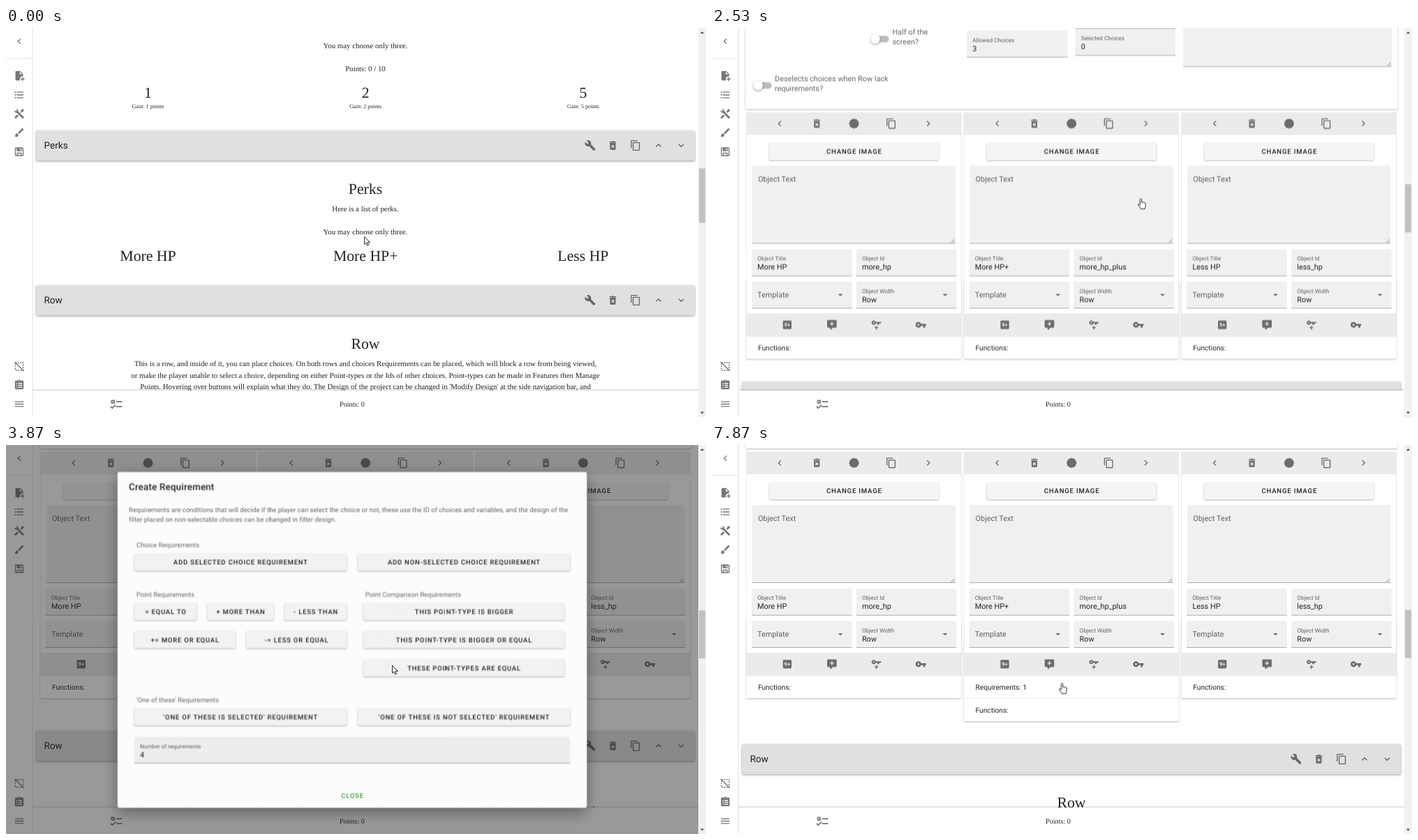
Recreate the animation shown at these times as an HTML page. Size 1003 by 558 pixels, loop 8000 ms.

```html
<!DOCTYPE html>
<html lang="en">
<head>
<meta charset="utf-8">
<title>Row editor</title>
<style>
html, body { margin: 0; width: 100%; height: 100%; overflow: hidden; background: #fff; }
svg { display: block; width: 1003px; height: 558px; }
text { font-family: Roboto, sans-serif; fill: #000; fill-opacity: .87; text-rendering: geometricPrecision; white-space: pre; }
.serif { font-family: "Liberation Serif", "Times New Roman", serif; }
.mid { text-anchor: middle; }
.soft { fill-opacity: .6; }
.btn { font-weight: 500; letter-spacing: .0893em; }
.ic { fill: #000; fill-opacity: .54; fill-rule: evenodd; }
.bar { fill: #e0e0e0; }
.tool { fill: #ebebeb; }
.sh { filter: drop-shadow(0 1.2px .9px rgba(0,0,0,.28)); }
.sh2 { filter: drop-shadow(0 1.5px 1.8px rgba(0,0,0,.4)); }
.sh3 { filter: drop-shadow(0 7px 11px rgba(0,0,0,.38)); }

/* one shared 8 s clock: 1% = 80 ms */
.anim { animation: 8s linear infinite; }
.step { animation: 8s step-end infinite; }
#page { animation-name: scroll; }
#closed, #thumbClosed { animation-name: closed; }
#open, #thumbOpen { animation-name: open; }
#thumbMove { animation-name: thumb; }
#rows { animation-name: rows; }
#grow { animation-name: grow; }
#req { animation-name: req; }
#fieldHover { animation-name: fieldHover; }
#keyHover { animation-name: keyHover; }
#scrim { animation-name: scrim; }
#dialog { animation-name: dialog; transform-origin: 496px 279.5px; }
#btnHover { animation-name: btnHover; }
#ripple { animation-name: ripple; transform-origin: 357px 166px; }
#cursor { animation-name: cursor; }
#arrow { animation-name: arrow; }
#hand { animation-name: hand; }
#beam { animation-name: beam; }

@keyframes scroll {
  0%, 23.6% { transform: translateY(0); animation-timing-function: ease-in; }
  28.37%, 29.1% { transform: translateY(-190px); animation-timing-function: ease-out; }
  35%, 100% { transform: translateY(-473px); }
}
@keyframes thumb {
  0%, 23.6% { transform: translateY(179.5px); animation-timing-function: ease-in; }
  28.37%, 29.1% { transform: translateY(203px); animation-timing-function: ease-out; }
  35%, 45.9% { transform: translateY(238px); }
  45.95%, 70.95% { transform: translateY(237.2px); }
  71%, 100% { transform: translateY(236.5px); }
}
@keyframes closed { 0% { opacity: 1; } 18.375% { opacity: 0; } }
@keyframes open { 0% { opacity: 0; } 18.375% { opacity: 1; } }
@keyframes rows {
  0% { transform: translateY(0); }
  18.375% { transform: translateY(500px); }
  45.95% { transform: translateY(514px); }
  71% { transform: translateY(533px); }
}
@keyframes grow {
  0% { transform: translateY(0); }
  45.95% { transform: translateY(14px); }
  71% { transform: translateY(33px); }
}
@keyframes req { 0% { opacity: 0; } 71% { opacity: 1; } }
@keyframes fieldHover { 0% { opacity: 0; } 22% { opacity: 1; } 35% { opacity: 0; } }
@keyframes keyHover { 0% { opacity: 0; } 38.8% { opacity: .08; } 45% { opacity: .2; } 47% { opacity: 0; } }
@keyframes scrim {
  0%, 45.95% { opacity: 0; }
  48.3%, 89.1% { opacity: .46; animation-timing-function: ease-in-out; }
  93%, 100% { opacity: 0; }
}
@keyframes dialog {
  0%, 45.95% { opacity: 0; transform: scale(.5); animation-timing-function: cubic-bezier(.25,.8,.25,1); }
  49.7%, 88.36% { opacity: 1; transform: scale(1); }
  88.37%, 100% { opacity: 0; transform: scale(1); }
}
@keyframes btnHover { 0% { opacity: 0; } 70% { opacity: .14; } 72.5% { opacity: 0; } }
@keyframes ripple {
  0%, 69.99% { opacity: 0; transform: scale(1); }
  70%, 70.8% { opacity: .25; transform: scale(1); }
  72.3% { opacity: .25; transform: scale(2); }
  75%, 100% { opacity: 0; transform: scale(2.2); }
}
@keyframes cursor {
  0%, 1.62% { transform: translate(513px,299px); animation-timing-function: cubic-bezier(.4,.1,.6,1); }
  11.6% { transform: translate(816px,180px); animation-timing-function: ease-out; }
  15%, 18.4% { transform: translate(840px,169px); animation-timing-function: ease-in-out; }
  22.8%, 33.5% { transform: translate(614px,244px); animation-timing-function: ease-in-out; }
  39.1%, 39.9% { transform: translate(552px,325px); }
  40.8%, 49% { transform: translate(553px,316px); animation-timing-function: ease-in; }
  55% { transform: translate(498px,278px); animation-timing-function: ease-out; }
  62.5%, 71% { transform: translate(373px,168px); animation-timing-function: ease-in-out; }
  80% { transform: translate(721px,210px); animation-timing-function: ease-out; }
  85%, 88.36% { transform: translate(884px,232px); }
  88.37%, 89.1% { transform: translate(887px,236px); animation-timing-function: ease-in-out; }
  98.3%, 100% { transform: translate(501px,341px); }
}
@keyframes arrow {
  0% { opacity: 1; } 13.6% { opacity: 0; } 19.3% { opacity: 1; } 22% { opacity: 0; }
  35% { opacity: 1; } 40% { opacity: 0; } 46% { opacity: 1; } 61.2% { opacity: 0; }
  72.5% { opacity: 1; } 88.37% { opacity: 0; } 90% { opacity: 1; } 97% { opacity: 0; }
}
@keyframes hand {
  0% { opacity: 0; } 13.6% { opacity: 1; } 19.3% { opacity: 0; } 22% { opacity: 1; }
  35% { opacity: 0; } 40% { opacity: 1; } 46% { opacity: 0; } 61.2% { opacity: 1; }
  72.5% { opacity: 0; } 97% { opacity: 1; }
}
@keyframes beam { 0% { opacity: 0; } 88.37% { opacity: 1; } 90% { opacity: 0; } }
</style>
</head>
<body>
<script>
// Type sizes: CSS pixels times the page scale
const px = n => +(n * .6795).toFixed(2);
const BODY = px(16), SMALL = px(12), BTN = px(14), PANEL = px(15), HEAD = px(32);
const COL = 311.7; // distance between card columns

const badge = 'M' + Array.from({ length: 24 }, (_, i) => {
  const a = i * Math.PI / 12, r = i % 2 ? 9.3 : 11;
  return (12 + r * Math.cos(a)).toFixed(1) + ' ' + (12 + r * Math.sin(a)).toFixed(1);
}).join('L') + 'Z';
const dot = (x, y) => `M${x - 1.5} ${y}a1.5 1.5 0 1 1 3 0a1.5 1.5 0 1 1 -3 0Z`;

const icons = {
  badge,
  left: 'M15.4 16.6L10.8 12L15.4 7.4L14 6L8 12L14 18Z',
  right: 'M8.6 16.6L13.2 12L8.6 7.4L10 6L16 12L10 18Z',
  up: 'M7.4 15.4L12 10.8L16.6 15.4L18 14L12 8L6 14Z',
  down: 'M7.4 8.6L12 13.2L16.6 8.6L18 10L12 16L6 10Z',
  caret: 'M7 10L12 15L17 10Z',
  wrench: 'M22.7 19L13.6 9.9C14.5 7.6 14 4.9 12.1 3C10.1 1 7.1.6 4.7 1.7L9 6L6 9L1.6 4.7C.4 7.1.9 10.1 2.9 12.1C4.8 14 7.5 14.5 9.8 13.6L18.9 22.7C19.3 23.1 19.9 23.1 20.3 22.7L22.6 20.4C23.1 20 23.1 19.3 22.7 19Z',
  trash: 'M6 19A2 2 0 0 0 8 21H16A2 2 0 0 0 18 19V7H6ZM8.5 11.9L9.9 10.5L12 12.6L14.1 10.5L15.5 11.9L13.4 14L15.5 16.1L14.1 17.5L12 15.4L9.9 17.5L8.5 16.1L10.6 14ZM15.5 4L14.5 3H9.5L8.5 4H5V6H19V4Z',
  copy: 'M19 21H8V7H19ZM19 5H8A2 2 0 0 0 6 7V21A2 2 0 0 0 8 23H19A2 2 0 0 0 21 21V7A2 2 0 0 0 19 5ZM16 1H4A2 2 0 0 0 2 3V17H4V3H16Z',
  list: 'M7 5H21V7H7ZM7 11H21V13H7ZM7 17H21V19H7Z' + dot(4, 6) + dot(4, 12) + dot(4, 18),
  file: 'M14 2H6C4.9 2 4 2.9 4 4V20C4 21.1 4.9 22 6 22H13.8C13.3 21.1 13 20 13 19C13 15.7 15.7 13 19 13L20 13.1V8ZM13 9V3.5L18.5 9ZM23 20H20V23H18V20H15V18H18V15H20V18H23Z',
  tools: 'M21.7 20.3L20.3 21.7A1 1 0 0 1 18.9 21.7L7 9.85A3.8 3.8 0 0 1 6 10A4 4 0 0 1 2.2 4.7L4.8 7.2L7.2 4.8L4.7 2.2A4 4 0 0 1 10 6A3.8 3.8 0 0 1 9.85 7L21.7 18.9A1 1 0 0 1 21.7 20.3ZM2.3 18.9A1 1 0 0 0 2.3 20.3L3.7 21.7A1 1 0 0 0 5.1 21.7L10.6 16.25L7.8 13.4ZM20 2L16 4V6L13.8 8.2L15.8 10.2L18 8H20L22 4Z',
  brush: 'M20.7 4.6L19.4 3.3C19 2.9 18.35 2.9 18 3.3L9 12.25L11.75 15L20.7 6C21.1 5.65 21.1 5 20.7 4.6ZM7 14A3 3 0 0 0 4 17C4 18.3 2.8 19 2 19C2.9 20.2 4.5 21 6 21A4 4 0 0 0 10 17A3 3 0 0 0 7 14Z',
  save: 'M5 3H19L21 5V19A2 2 0 0 1 19 21H5A2 2 0 0 1 3 19V5A2 2 0 0 1 5 3ZM5 5V19H19V5ZM7 5H17V11H7ZM13 5V9H15V5ZM7 14H17V19H15V16H9V19H7Z',
  clip: 'M19 3H14.8C14.4 1.8 13.3 1 12 1C10.7 1 9.6 1.8 9.2 3H5A2 2 0 0 0 3 5V19A2 2 0 0 0 5 21H19A2 2 0 0 0 21 19V5A2 2 0 0 0 19 3ZM11 4a1 1 0 1 1 2 0a1 1 0 1 1 -2 0ZM6 8H8V10H6ZM10 8H18V10H10ZM6 12H8V14H6ZM10 12H18V14H10ZM6 16H8V18H6ZM10 16H18V18H10Z',
  menu: 'M3 6H21V8H3ZM3 11H21V13H3ZM3 16H21V18H3Z',
  keyPlus: 'M6.5 3C8.5 3 10.1 4.25 10.7 6H22V9H18V12H14V9H10.7C10.1 10.75 8.5 12 6.5 12C4 12 2 10 2 7.5C2 5 4 3 6.5 3ZM5 7.5a1.5 1.5 0 1 0 3 0a1.5 1.5 0 1 0 -3 0ZM8 17H11V14H13V17H16V19H13V22H11V19H8Z',
  key: 'M5 12a2 2 0 1 0 4 0a2 2 0 1 0 -4 0ZM12.65 10C11.8 7.7 9.6 6 7 6A6 6 0 1 0 12.65 14H17V18H21V14H23V10Z',
  box: 'M5 3H19A2 2 0 0 1 21 5V19A2 2 0 0 1 19 21H5A2 2 0 0 1 3 19V5A2 2 0 0 1 5 3Z',
  comment: 'M9 22A1 1 0 0 1 8 21V18H4A2 2 0 0 1 2 16V4A2 2 0 0 1 4 2H20A2 2 0 0 1 22 4V16A2 2 0 0 1 20 18H13.9L10.2 21.7Q9.8 22 9 22ZM11 6V9H8V11H11V14H13V11H16V9H13V6Z',
  checks: 'M3 5H9V11H3ZM5 7V9H7V7ZM11 7H21V9H11ZM11 15H21V17H11ZM5 20L1.5 16.5L2.9 15.1L5 17.2L9.6 12.6L11 14Z',
};

const text = (x, y, s, size = BODY, cls = '') => `<text x="${x}" y="${y}" font-size="${size}" class="${cls}">${s}</text>`;
const serif = (x, y, s, size = BODY) => text(x, y, s, size, 'serif mid');
const rect = (x, y, w, h, attrs = '') => `<rect x="${x}" y="${y}" width="${w}" height="${h}" ${attrs}/>`;
const icon = (name, x, y, size = 16.4) =>
  `<path class="ic" d="${icons[name]}" transform="translate(${x - size / 2} ${y - size / 2}) scale(${size / 24})"/>`;
const iconRow = (y, list) => list.map(([name, x]) => icon(name, x, y)).join('');

const button = (x1, x2, cy, label) =>
  rect(x1, cy - 12.3, x2 - x1, 24.7, 'rx="2.5" fill="#f5f5f5" class="sh"') +
  text((x1 + x2) / 2 + .4, cy + 3.5, label, BTN, 'btn mid');

const box = (x, y, w, h) =>
  `<path d="M${x} ${y + h}v${3 - h}q0 -3 3 -3h${w - 6}q3 0 3 3v${h - 3}Z" fill="#f0f0f0"/>` +
  rect(x, y + h - .7, w, .7, 'fill-opacity=".42"');
const field = (x, y, w, label, value, caret) =>
  box(x, y, w, 38.5) +
  (value ? text(x + 8.2, y + 16.2, label, SMALL, 'soft') + text(x + 8.2, y + 29.4, value)
         : text(x + 8.2, y + 22.8, label, BODY, 'soft')) +
  (caret ? icon('caret', x + w - 16.5, y + 19) : '');
const area = (x, y, w, h) => box(x, y, w, h) +
  `<path d="M${x + w - 6.5} ${y + h - 1.5}l5 -5M${x + w - 3.5} ${y + h - 1.5}l2 -2" stroke="#777" stroke-width=".8"/>`;
const toggle = (x, y) =>
  rect(x - 4, y - 4.8, 23.5, 9.6, 'rx="4.8" fill="#bdbdbd"') +
  `<circle cx="${x}" cy="${y}" r="6.8" fill="#fff" class="sh2"/>`;

const header = (y, label) =>
  rect(43, y, 944, 43.3, 'rx="2.5" class="bar sh2"') + text(54.5, y + 26, label, px(20)) +
  iconRow(y + 21.5, [['wrench', 837], ['trash', 869.5], ['copy', 902], ['up', 935], ['down', 967.5]]);

const columns = fn => [0, 1, 2].map(i => fn(203.5 + i * COL, i)).join('');

const closedRow = serif(515, 238, 'Perks', HEAD) + serif(515, 263, 'Here is a list of perks.') +
  serif(515, 296, 'You may choose only three.') +
  columns((x, i) => serif(x, 334, ['More HP', 'More HP+', 'Less HP'][i], HEAD));

// Row settings, drawn in a frame shifted by the first scroll distance
const settings = `<g transform="translate(0 190)">` +
  rect(48, 10, 934.5, 278, 'rx="2.5" fill="#fff" class="sh"') + rect(48, 10, 934.5, 32, 'class="tool"') +
  iconRow(25.7, [['file', 866], ['list', 898.3], ['keyPlus', 931], ['badge', 963.5]]) +
  button(55.5, 200, 70.5, 'CHANGE IMAGE') +
  [[234, 73], [234, 104], [234, 142.5], [234, 187.5], [66, 254]].map(p => toggle(...p)).join('') +
  [[74, 'Button?'], [105, 'Non-activatable?'], [136.5, 'Selected'], [150, 'Choices?'], [181.3, 'Half of the'], [194.8, 'screen?']]
    .map(([y, s]) => text(258.5, y, s, BODY, 'soft')).join('') +
  text(90, 248, 'Deselects choices when Row lack', BODY, 'soft') + text(90, 261.7, 'requirements?', BODY, 'soft') +
  field(365, 58.3, 144.5, 'Template', 'Image Top', 1) +
  field(365, 117, 144.5, 'Row Title', 'Perks') +
  field(365, 175.3, 144.5, 'Allowed Choices', '3') +
  field(520.5, 58.3, 143.5, 'Objects Per Row', '3 per Row', 1) +
  `<g id="fieldHover" class="step">${rect(520.5, 58.3, 143.5, 38.5, 'rx="2.5" fill-opacity=".08"')}${rect(520.5, 96.1, 143.5, .8, 'fill-opacity=".6"')}</g>` +
  field(520.5, 96.5, 143.5, 'Choices Justify', '', 1) +
  field(520.5, 134.5, 143.5, 'Row Id', 'ff30') +
  field(520.5, 172.8, 143.5, 'Selected Choices', '0') +
  area(675.3, 58.3, 298.7, 169) + text(683.5, 74.5, 'Row Text', SMALL, 'soft') +
  text(683.5, 87.8, 'Here is a list of perks.') + text(683.5, 126, 'You may choose only three.') + '</g>';

const card = (cx, i) => {
  const x = cx - 154.3, mid = i === 1;
  const [title, id] = [['More HP', 'more_hp'], ['More HP+', 'more_hp_plus'], ['Less HP', 'less_hp']][i];
  return `<g ${mid ? 'id="grow" class="step"' : ''}>` +
    rect(x, 250, 308, 113.3, 'rx="2.5" fill="#fff" class="sh"') + text(x + 16.7, 350.5, 'Functions:', PANEL) + '</g>' +
    (mid ? `<g id="req" class="step">${rect(x, 331, 308, 32.5, 'fill="#fff"')}${rect(x, 363, 308, .7, 'fill-opacity=".12"')}${text(x + 16.7, 350.5, 'Requirements: 1', PANEL)}</g>` : '') +
    rect(x, 10, 308, 321, 'fill="#fff" stroke="#ddd" stroke-width=".6"') +
    rect(x, 10, 308, 32, 'class="tool"') + rect(x, 298, 308, 33, 'class="tool"') +
    iconRow(25.7, [['left', cx - 106.5], ['trash', cx - 53.3], ['badge', cx], ['copy', cx + 53.3], ['right', cx + 106.5]]) +
    button(cx - 121.5, cx + 121.5, 65.7, 'CHANGE IMAGE') +
    area(cx - 146, 86, 291.5, 112) + text(cx - 137.6, 109, 'Object Text', BODY, 'soft') +
    field(cx - 146.7, 206, 143.7, 'Object Title', title) + field(cx + 3.2, 206, 143.7, 'Object Id', id) +
    field(cx - 146.7, 252.3, 143.7, 'Template', '', 1) + field(cx + 3.2, 252.3, 143.7, 'Object Width', 'Row', 1) +
    (mid ? `<circle id="keyHover" class="step" cx="547" cy="314.3" r="16.4"/>` : '') +
    iconRow(314.3, [['box', cx - 95.7], ['comment', cx - 31.7], ['keyPlus', cx + 32], ['key', cx + 95.7]]) +
    `<text x="${cx - 95.7}" y="317" font-size="7.6" font-weight="700" class="mid" style="fill:#ebebeb;fill-opacity:1">9+</text>`;
};

const rowSection = header(369, 'Row') + serif(515, 460, 'Row', HEAD) + [
  'This is a row, and inside of it, you can place choices. On both rows and choices Requirements can be placed, which will block a row from being viewed,',
  'or make the player unable to select a choice, depending on either Point-types or the Ids of other choices. Point-types can be made in Features then Manage',
  "Points. Hovering over buttons will explain what they do. The Design of the project can be changed in 'Modify Design' at the side navigation bar, and",
].map((s, i) => serif(515, 485.3 + i * 16.4, s)).join('');

const page = `<g id="page" class="anim">` +
  serif(515, 29, 'You may choose only three.') + serif(515, 62, 'Points: 0 / 10') +
  columns((x, i) => serif(x, 100, [1, 2, 5][i], HEAD) + serif(x, 114.5, `Gain: ${[1, 2, 5][i]} points`, SMALL)) +
  header(147, 'Perks') +
  `<g id="closed" class="step">${closedRow}</g>` +
  `<g id="open" class="step">${settings}<g transform="translate(0 473)">${columns(card)}</g></g>` +
  `<g id="rows" class="step">${rowSection}</g></g>`;

const chrome = rect(38, 520, 954, 38, 'fill="#fff" style="filter:drop-shadow(0 -1px 1px rgba(0,0,0,.2))"') +
  icon('checks', 158.5, 539.5, 21) + serif(496, 543, 'Points: 0', PANEL) +
  rect(0, 0, 38, 558, 'fill="#fff"') + rect(37.6, 0, .8, 558, 'fill="#d8d8d8"') + rect(0, 43, 38, .8, 'fill="#e0e0e0"') +
  [['left', 19], ['file', 68.5], ['list', 96], ['tools', 123], ['brush', 150], ['save', 177.5], ['clip', 512], ['menu', 539.5]]
    .map(([n, y]) => icon(n, 19, y)).join('') +
  `<g fill="none" stroke="#757575" stroke-width="1.4"><rect x="13.5" y="480" width="11" height="11" stroke-dasharray="2 1.4"/><path d="M12.5 479L25.5 492"/></g>`;

const scrollbar = rect(992, 0, 11, 558, 'fill="#f1f1f1"') +
  `<path d="M994.8 8L997.5 5L1000.2 8ZM994.8 550.5L997.5 553.5L1000.2 550.5Z" fill="#505050"/>` +
  `<g id="thumbClosed" class="step">${rect(993, 201.5, 9, 78, 'fill="#c1c1c1"')}</g>` +
  `<g id="thumbOpen" class="step"><g id="thumbMove" class="anim">${rect(993, 0, 9, 69, 'fill="#c1c1c1"')}</g></g>`;

const label = (x, y, s) => text(x, y, s, BTN, 'soft');
const dialog = `<g id="dialog" class="anim">` +
  rect(155.7, 35.7, 680.6, 487.5, 'rx="2.7" fill="#fff" class="sh3"') +
  `<text x="172" y="62" font-size="${px(20)}" font-weight="500" letter-spacing=".17">Create Requirement</text>` +
  `<g letter-spacing=".068">` +
  label(172, 94, 'Requirements are conditions that will decide if the player can select the choice or not, these use the ID of choices and variables, and the design of the') +
  label(172, 108.3, 'filter placed on non-selectable choices can be changed in filter design.') +
  label(183, 145, 'Choice Requirements') + label(183, 216.5, 'Point Requirements') +
  label(515, 216.5, 'Point Comparison Requirements') + label(183, 370, "'One of these' Requirements") + '</g>' +
  [
    [180, 488, 166.5, 'ADD SELECTED CHOICE REQUIREMENT'], [504, 812, 166.5, 'ADD NON-SELECTED CHOICE REQUIREMENT'],
    [180, 270.5, 238.3, '= EQUAL TO'], [286, 382, 238.3, '+ MORE THAN'], [398, 488, 238.3, '- LESS THAN'],
    [180, 326.5, 279, '+= MORE OR EQUAL'], [342, 488, 279, '-= LESS OR EQUAL'],
    [512, 804, 238.3, 'THIS POINT-TYPE IS BIGGER'], [512, 804, 279, 'THIS POINT-TYPE IS BIGGER OR EQUAL'],
    [512, 804, 320, 'THESE POINT-TYPES ARE EQUAL'],
    [180, 488, 391.3, "'ONE OF THESE IS SELECTED' REQUIREMENT"], [504, 812, 391.3, "'ONE OF THESE IS NOT SELECTED' REQUIREMENT"],
  ].map(b => button(...b)).join('') +
  rect(180, 154.2, 308, 24.7, 'rx="2.5" id="btnHover" class="step"') +
  `<g clip-path="url(#btnClip)"><circle id="ripple" class="anim" cx="357.5" cy="166" r="88"/></g>` +
  field(180, 420.3, 632, 'Number of requirements', '4') +
  `<text x="496.4" y="509.3" font-size="${BTN}" class="btn mid" style="fill:#3a9f3e;fill-opacity:1">CLOSE</text></g>`;

const cursor = `<g id="cursor" class="anim" fill="#fff" stroke="#111" stroke-width=".9" stroke-linejoin="round">` +
  `<path id="arrow" class="step" d="M.5 .5V11.2L3 9L4.8 13L6.6 12.2L4.9 8.4H8.4Z"/>` +
  `<g transform="translate(0 .7)"><path id="hand" class="step" d="M-.7 1.5a1.2 1.2 0 0 1 2.4 0V5.6c.4-.8 1.9-.7 2 .2c.5-.7 1.8-.5 1.9.4c.6-.5 1.6-.2 1.6.8V10.5c0 1.6-.9 2.3-.9 4.3H.3c0-1.7-2.4-3.3-3.5-5.5c-.7-1.5.6-2.1 1.5-1.1L-.7 9.3Z"/></g>` +
  `<path id="beam" class="step" fill="none" stroke="#333" d="M-2.2 -5.5H-.6L0 -5L.6 -5.5H2.2M0 -5V5M-2.2 5.5H-.6L0 5L.6 5.5H2.2"/></g>`;

document.body.innerHTML = `<svg viewBox="0 0 1003 558" xmlns="http://www.w3.org/2000/svg">
  <clipPath id="btnClip">${rect(180, 154.2, 308, 24.7, 'rx="2.5"')}</clipPath>
  ${page}${chrome}
  ${rect(0, 0, 992, 558, 'id="scrim" class="anim" fill="#212121"')}
  ${dialog}${scrollbar}${cursor}</svg>`;
</script>
</body>
</html>
```
